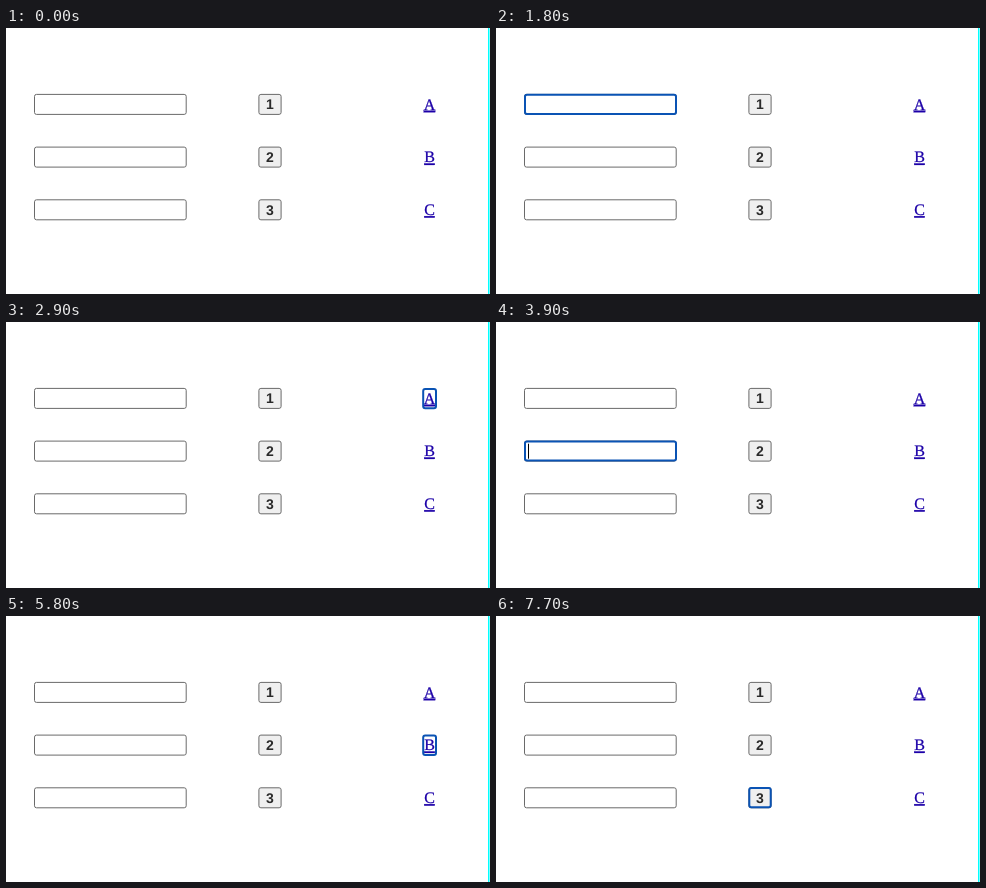
Recreate the animation shown at these times as an HTML page. Size 484x266 px, loop 8000 ms.

```html
<!DOCTYPE html>
<html lang="en">
<head>
<meta charset="utf-8">
<title>Tab order</title>
<style>
html, body { margin: 0; width: 100%; height: 100%; overflow: hidden; background: #fff; }
svg { display: block; text-rendering: geometricPrecision; }
.box { fill: #fff; stroke: #6a6a6a; }
.button { fill: #efefef; }
.ring { fill: none; stroke: #0a53b4; stroke-width: 2; }
.label { font: bold 14px "Liberation Sans", Arial, sans-serif; fill: #2a2a2a; text-anchor: middle; }
.link { font: 16px "Liberation Serif", Times, serif; fill: #1c00a8; stroke: #1c00a8; stroke-width: .25; text-anchor: middle; text-decoration: underline; }
</style>
</head>
<body>
<svg id="stage" width="484" height="266" viewBox="0 0 484 266"></svg>
<script>
const LOOP = 8000, BLINK = 500, TOP = 66, PITCH = 52.7;
// Time at which each control takes focus, in tab order
const focusTimes = [300, 1900, 2900, 3900, 4800, 5800, 6800, 7700];
const stage = document.getElementById("stage");

function add(tag, attrs, text = "") {
  const el = document.createElementNS("http://www.w3.org/2000/svg", tag);
  for (const key in attrs) el.setAttribute(key, attrs[key]);
  el.textContent = text;
  stage.append(el);
  return el;
}

const box = (x, y, width, height, cls) =>
  add("rect", { x, y, width, height, rx: 2, class: cls });

const rings = [], carets = [];
add("rect", { x: 482, y: 0, width: 1.5, height: 266, fill: "#0ff" });
[..."ABC"].forEach((letter, i) => {
  const top = TOP + i * PITCH;
  box(28.5, top + .4, 151.7, 20, "box");
  box(252.9, top + .4, 22.2, 20, "box button");
  add("text", { x: 264, y: top + 15.1, class: "label" }, i + 1);
  add("text", { x: 423.5, y: top + 15.7, class: "link" }, letter);
  rings.push(
    box(29, top + .7, 151, 19.2, "ring"),
    box(253.3, top + .7, 21.4, 19.2, "ring"),
    box(417.2, top + .9, 12.8, 19.4, "ring"));
  carets.push(add("rect", { x: 32, y: top + 3, width: 1, height: 15, fill: "#000" }));
});

const show = (el, on) => el.setAttribute("visibility", on ? "visible" : "hidden");

function draw(now) {
  const t = now % LOOP;
  const focused = focusTimes.filter(start => start <= t).length - 1;
  const caretOn = Math.floor((t - focusTimes[focused]) / BLINK) % 2 === 0;
  rings.forEach((ring, i) => show(ring, i === focused));
  carets.forEach((caret, i) => show(caret, i * 3 === focused && caretOn));
}

const begin = performance.now();
function tick() {
  draw(performance.now() - begin);
  requestAnimationFrame(tick);
}
tick();
</script>
</body>
</html>
```
